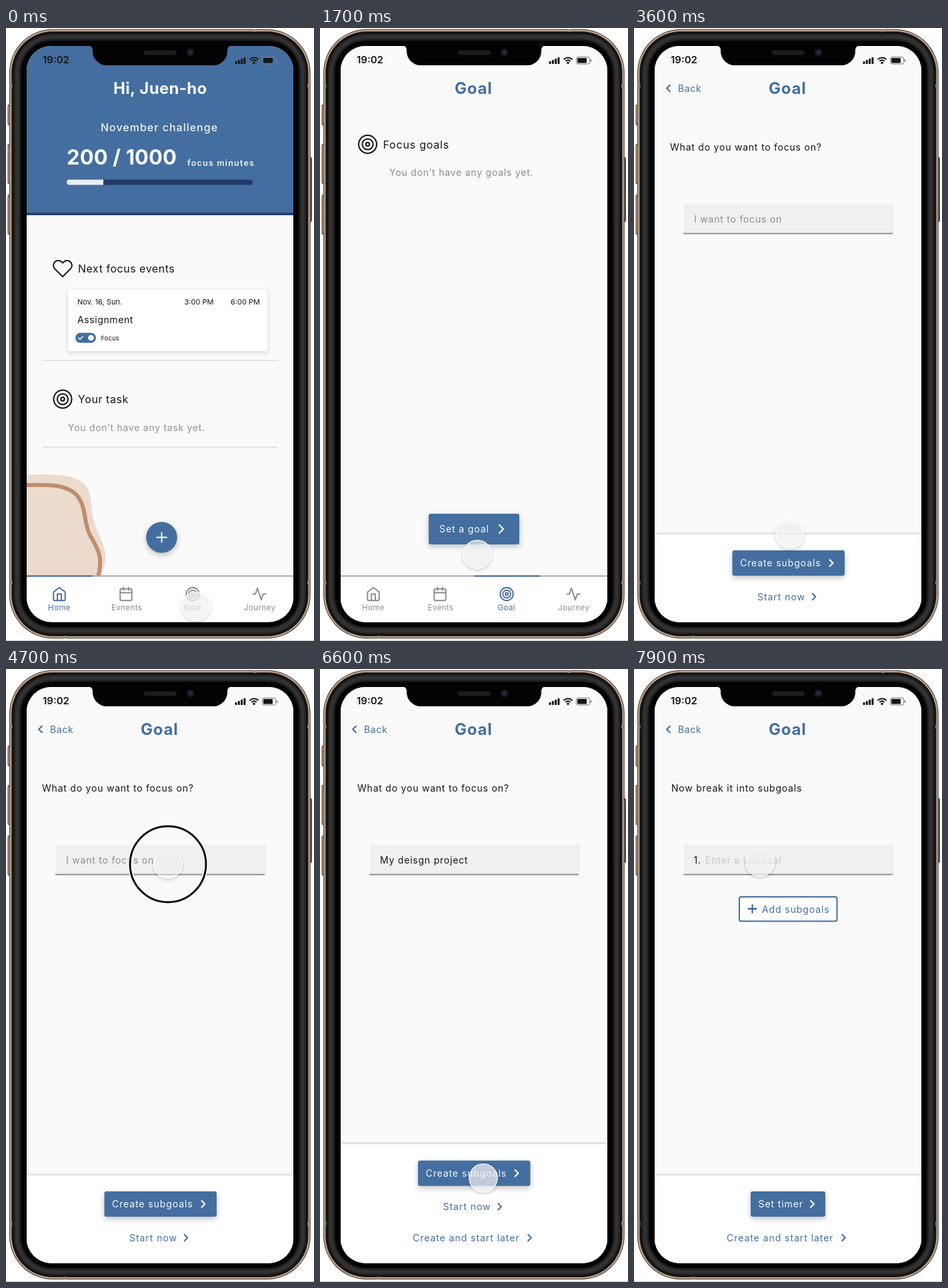
An HTML page with a canvas that plays this animation: 462 by 920 pixels, repeating every 8 s.

```html
<!DOCTYPE html>
<html lang="en">
<head>
<meta charset="utf-8">
<title>Focus app</title>
<style>
html, body { margin: 0; width: 100%; height: 100%; overflow: hidden; background: #fff; }
canvas { display: block; width: 462px; height: 920px; }
</style>
</head>
<body>
<canvas id="stage"></canvas>
<script>
const W = 462, H = 920, LOOP = 8000, STEP = 100;
const BLUE = '#446e9f', INK = '#151515', GREY = '#8b8b8b', PAPER = '#fafafa';
const cv = document.getElementById('stage');
const ratio = window.devicePixelRatio || 1;
cv.width = W * ratio;
cv.height = H * ratio;
const c = cv.getContext('2d');

const ICONS = {
  home: 'M3 9l9-7 9 7v11a2 2 0 0 1-2 2H5a2 2 0 0 1-2-2z M9 22V12h6v10',
  calendar: 'M5 4h14a2 2 0 0 1 2 2v14a2 2 0 0 1-2 2H5a2 2 0 0 1-2-2V6a2 2 0 0 1 2-2z M16 2v4 M8 2v4 M3 10h18',
  target: 'M22 12a10 10 0 1 1-20 0a10 10 0 1 1 20 0z M18 12a6 6 0 1 1-12 0a6 6 0 1 1 12 0z M14 12a2 2 0 1 1-4 0a2 2 0 1 1 4 0z',
  pulse: 'M22 12h-4l-3 9L9 3l-3 9H2',
  heart: 'M20.84 4.61a5.5 5.5 0 0 0-7.78 0L12 5.67l-1.06-1.06a5.5 5.5 0 0 0-7.78 7.78L12 21.23l8.84-8.84a5.5 5.5 0 0 0 0-7.78z',
  right: 'M9 6l6 6-6 6',
  left: 'M15 6l-6 6 6 6',
  plus: 'M12 5v14 M5 12h14',
  check: 'M5 12l5 5 9-10'
};
const paths = {};
for (const k in ICONS) paths[k] = new Path2D(ICONS[k]);

const clamp = v => Math.max(0, Math.min(1, v));
const ease = v => v * v * (3 - 2 * v);

function text(s, x, y, size = 14, color = INK, weight = 400, gap = 0.78) {
  c.font = `${weight} ${size}px Inter, "Open Sans", sans-serif`;
  c.letterSpacing = gap + 'px';
  c.fillStyle = color;
  c.fillText(s, x, y + size * 0.364);
}

function icon(name, x, y, scale, color, width = 2) {
  c.save();
  c.translate(x, y);
  c.scale(scale, scale);
  c.translate(-12, -12);
  c.strokeStyle = color;
  c.lineWidth = width;
  c.lineCap = c.lineJoin = 'round';
  c.stroke(paths[name]);
  c.restore();
}

function box(x, y, w, h, r, color) {
  c.beginPath();
  c.roundRect(x, y, w, h, r);
  c.fillStyle = color;
  c.fill();
}

function rect(x, y, w, h, color) {
  c.fillStyle = color;
  c.fillRect(x, y, w, h);
}

function disc(x, y, r, color) {
  c.beginPath();
  c.arc(x, y, r, 0, Math.PI * 2);
  c.fillStyle = color;
  c.fill();
}

function raised(draw, blur = 8, drop = 3, alpha = 0.25) {
  c.save();
  c.shadowColor = `rgba(0,0,0,${alpha})`;
  c.shadowBlur = blur * ratio;
  c.shadowOffsetY = drop * ratio;
  draw();
  c.restore();
}

function button(label, x, y, w, h, textX, arrowX) {
  raised(() => box(x, y, w, h, 3, BLUE));
  text(label, textX, y + h / 2, 14, '#f4f7fb', 400, 0.9);
  icon('right', arrowX, y + h / 2, h > 40 ? 1 : 0.8, '#fff', h > 40 ? 2 : 2.6);
}

function link(label, x, y, arrowX) {
  text(label, x, y, 14, BLUE, 400, 0.95);
  icon('right', arrowX, y, 0.78, BLUE, 2.6);
}

function tabs(active, second) {
  rect(31, 822, 400, 70, '#fff');
  rect(31, 821.5, 400, 2, '#a9a9ab');
  rect(31 + active * 100, 821.5, 99, 2, BLUE);
  const items = [['home', 'Home', 63], ['calendar', second, 158], ['target', 'Goal', 266.5], ['pulse', 'Journey', 357]];
  items.forEach(([name, label, x], i) => {
    const color = i === active ? BLUE : GREY;
    icon(name, 80 + i * 100, 849.5, 0.97, color);
    text(label, x + (label === 'Events' ? 3.5 : 0), 869.5, 11.5, color, 400, 0.4);
  });
}

function blob() {
  c.beginPath();
  c.moveTo(31, 671);
  c.bezierCurveTo(62, 668, 102, 670, 116, 683);
  c.bezierCurveTo(132, 698, 125, 720, 133, 744);
  c.bezierCurveTo(141, 767, 150, 777, 149.5, 798);
  c.quadraticCurveTo(147, 812, 142, 822);
  c.lineTo(31, 822);
  c.fillStyle = '#ecdacd';
  c.fill();
  c.beginPath();
  c.moveTo(28, 686);
  c.bezierCurveTo(64, 685, 90, 685, 105, 700);
  c.bezierCurveTo(121, 717, 116, 740, 125, 759);
  c.bezierCurveTo(135, 779, 147, 790, 138, 824);
  c.strokeStyle = '#bd8e6e';
  c.lineWidth = 6;
  c.stroke();
}

function homePage() {
  rect(31, 27, 400, 865, PAPER);
  rect(31, 27, 400, 251, BLUE);
  rect(31, 277, 400, 4, '#263f70');
  text('Hi, Juen-ho', 161, 90, 24, '#f6f8fb', 700, 0.3);
  text('November challenge', 142, 149, 16, '#edf2f8', 500, 1);
  text('200 / 1000', 91, 194, 31, '#f6f8fb', 700, 0.1);
  text('focus minutes', 272, 202, 12.5, '#edf2f8', 600, 1.2);
  box(91, 227.5, 279, 8, 4, '#233b68');
  box(91, 227.5, 55, 8, [4, 0, 0, 4], '#e9eff7');

  icon('heart', 85, 361, 1.33, INK, 1.5);
  text('Next focus events', 108, 361, 16, INK, 400, 0.52);
  raised(() => box(93, 392, 299, 93, 3, '#fff'), 7, 2, 0.17);
  text('Nov. 16, Sun.', 107, 411, 11, INK, 400, 0);
  text('3:00 PM', 267.5, 411, 11, INK, 400, 0);
  text('6:00 PM', 337, 411, 11, INK, 400, 0);
  text('Assignment', 107, 438, 14, INK, 400, 0.6);
  box(104, 457.5, 31, 15, 7.5, BLUE);
  icon('check', 112, 465, 0.46, '#fff', 3);
  disc(127.5, 465, 4.3, '#fff');
  text('Focus', 142.5, 465.5, 9.5, INK, 400, 0.1);
  rect(55, 498, 353, 1.6, '#dedede');

  icon('target', 85, 557, 1.35, INK, 1.5);
  text('Your task', 108, 557, 16, INK, 400, 0.58);
  text('You don’t have any task yet.', 93, 600, 14, '#929292', 400, 0.72);
  rect(55, 628.3, 353, 1.6, '#dedede');
  blob();
  raised(() => disc(233.5, 764.5, 23.3, BLUE));
  icon('plus', 233.5, 764.5, 1.05, '#fff', 1.8);
  tabs(0, 'Evnents');
}

function pageTitle() {
  rect(31, 27, 400, 865, PAPER);
  text('Goal', 202, 90.5, 24, BLUE, 700, 0.75);
}

function goalPage() {
  pageTitle();
  icon('target', 71.5, 174.5, 1.35, INK, 1.5);
  text('Focus goals', 94.5, 175, 16, INK, 400, 0.78);
  text('You don’t have any goals yet.', 104, 216.5, 14, GREY);
  button('Set a goal', 163, 729, 136, 46, 179, 272);
  tabs(2, 'Events');
}

function formPage(question, x, panelTop) {
  pageTitle();
  icon('left', 51.5, 90.5, 0.8, BLUE, 2.6);
  text('Back', 66, 91, 14, BLUE, 400, 0.65);
  text(question, x, 178.5);
  rect(75, 264, 315, 45, '#f0f0f0');
  rect(74, 307.5, 314, 2, '#929292');
  raised(() => rect(31, panelTop, 400, 892 - panelTop, '#fff'), 4, -1, 0.22);
}

function askPage() {
  formPage('What do you want to focus on?', 54, 760);
  text('I want to focus on', 90, 287, 14, '#8d8d8d');
  button('Create subgoals', 147.5, 784, 168.5, 38, 159, 296);
  link('Start now', 185, 853.5, 270);
}

function filledPage() {
  formPage('What do you want to focus on?', 56, 713);
  text('My deisgn project', 90, 287);
  button('Create subgoals', 147, 737.7, 168.5, 38, 158.5, 295);
  link('Start now', 184.5, 807, 269.5);
  link('Create and start later', 139, 853.5, 314.5);
}

function subgoalPage() {
  formPage('Now break it into subgoals', 56, 760);
  text('1.', 89.5, 287);
  text('Enter a subgoal', 107, 287, 14, '#c6c6c6');
  c.beginPath();
  c.roundRect(158, 342, 146.5, 36.5, 3);
  c.fillStyle = '#fff';
  c.fill();
  c.strokeStyle = BLUE;
  c.lineWidth = 2;
  c.stroke();
  icon('plus', 177.5, 360, 0.86, '#2a56a0', 2.2);
  text('Add subgoals', 192, 360.5, 14, BLUE, 400, 0.9);
  button('Set timer', 175, 784, 112, 38, 186.5, 267.5);
  link('Create and start later', 139, 853.5, 314.5);
}

function statusBar() {
  text('19:02', 55, 48, 15, INK, 600, 0);
  for (let i = 0; i < 4; i++) box(343.5 + i * 4.3, 50 - i * 2, 3, 4 + i * 2, 0.8, INK);
  c.strokeStyle = INK;
  c.lineWidth = 2;
  for (const r of [4.8, 8.6]) {
    c.beginPath();
    c.arc(372, 53, r, -Math.PI * 0.77, -Math.PI * 0.23);
    c.stroke();
  }
  disc(372, 52.2, 1.8, INK);
  c.beginPath();
  c.roundRect(384.5, 43.5, 20, 10.5, 2.5);
  c.strokeStyle = '#777';
  c.lineWidth = 1;
  c.stroke();
  box(386, 45, 14, 7.5, 1.2, INK);
  box(405.7, 46.8, 1.5, 4, 0.7, '#777');
}

// one layer of the phone body, set in from its outline
function shell(inset, color) {
  box(5 + inset, 1.8 + inset, 451.8 - inset * 2, 914.4 - inset * 2, 65 - inset * 1.05, color);
}

function phone() {
  const brown = '#57463b', gold = '#c4aa94';
  const sides = [[2.5, 115, 31], [2.5, 174, 60], [2.5, 250, 60], [453, 194, 97]];
  for (const [x, y, h] of sides) {
    box(x, y, 6, h, 2, brown);
    box(x + 1.3, y + 1.5, 2.6, h - 3, 1, gold);
  }
  shell(0, brown);
  shell(1.2, gold);
  shell(3.2, '#352c27');
  // dark glass edge, lightest in the middle of its width
  for (let i = 4.5; i < 18; i += 0.75) {
    const v = 8 + 44 * Math.sin((i - 4.5) / 13.5 * Math.PI);
    shell(i, `rgb(${v},${v},${v + 1})`);
  }
  shell(18, '#020202');
  for (const y of [84, 830]) {
    rect(5.5, y, 4, 5, '#92847a');
    rect(452, y, 4, 5, '#92847a');
  }
  rect(371, 2, 5, 4, '#92847a');
  rect(86, 912, 5, 4, '#92847a');
  rect(0, 919, W, 1, '#c9c9c9');
}

function notch() {
  c.beginPath();
  c.moveTo(122, 26);
  c.quadraticCurveTo(130, 26, 130, 34);
  c.arcTo(130, 56, 152, 56, 21);
  c.arcTo(332, 56, 332, 34, 21);
  c.lineTo(332, 34);
  c.quadraticCurveTo(332, 26, 340, 26);
  c.fillStyle = '#020202';
  c.fill();
  box(207, 33.5, 49, 7, 3.5, '#1d1d1f');
  disc(276.5, 36.5, 6, '#14161d');
  disc(276.5, 36.5, 3, '#222b48');
}

// [start, page]: each page dissolves in over 200 ms
const pages = [[-200, homePage], [1000, goalPage], [3400, askPage], [4900, filledPage], [6900, subgoalPage]];
// [start, end, x, y]: pointer moves; equal start and end is a jump
const moves = [[0, 200, 281, 859], [1700, 1700, 236, 790], [1700, 2300, 234, 756], [3400, 3600, 234, 760],
  [3700, 4400, 243, 293], [5300, 6300, 245, 764], [7200, 7900, 189, 290]];
// [start, length]: taps
const taps = [[900, 300], [2900, 400], [4500, 400], [6600, 400]];

function pointerAt(t) {
  let x = 285, y = 868;
  for (const [a, b, px, py] of moves) {
    const k = a === b ? +(t >= a) : ease(clamp((t - a) / (b - a)));
    x += (px - x) * k;
    y += (py - y) * k;
  }
  return [x, y];
}

function pointer(t) {
  const [x, y] = pointerAt(t);
  const tap = taps.find(([a, d]) => t > a && t < a + d);
  c.save();
  c.beginPath();
  c.rect(0, 0, W, H);
  c.arc(x, y, 22, 0, Math.PI * 2, true);
  c.clip();
  raised(() => disc(x, y, 21.5, '#eee'), 5, 2, 0.22);
  c.restore();
  disc(x, y, 21.5, `rgba(240,240,241,${tap ? 0.5 : 0.72})`);
  c.beginPath();
  c.arc(x, y, 21.3, 0, Math.PI * 2);
  c.strokeStyle = 'rgba(255,255,255,0.75)';
  c.lineWidth = 1.4;
  c.stroke();
  if (!tap) return;
  const p = (t - tap[0]) / tap[1];
  const r = 22 + 46.6 * (1 - (1 - p) * (1 - p));
  c.save();
  c.globalAlpha = p > 0.5 ? 2 - 2 * p : 1;
  for (const [color, width] of [['#fff', 6], ['#080808', 3]]) {
    c.beginPath();
    c.arc(x, y, r, 0, Math.PI * 2);
    c.strokeStyle = color;
    c.lineWidth = width;
    c.stroke();
  }
  c.restore();
}

function draw(t) {
  c.setTransform(ratio, 0, 0, ratio, 0, 0);
  c.globalAlpha = 1;
  rect(0, 0, W, H, '#fff');
  phone();
  c.save();
  c.beginPath();
  c.roundRect(31, 27, 400, 864.5, 37);
  c.clip();
  const shown = pages.filter(([a]) => t > a).slice(-2);
  for (const [a, page] of shown) {
    c.globalAlpha = clamp((t - a) / 200);
    page();
  }
  c.globalAlpha = 1;
  statusBar();
  pointer(t);
  c.restore();
  notch();
}

const began = performance.now();
function tick() {
  const t = (performance.now() - began) % LOOP;
  draw(Math.floor(t / STEP) * STEP);
  requestAnimationFrame(tick);
}
tick();
</script>
</body>
</html>
```
